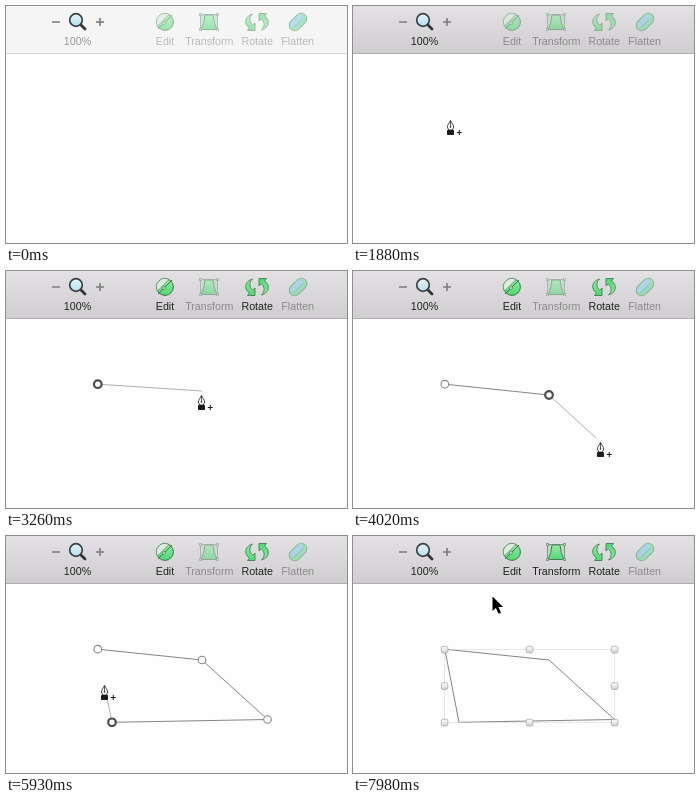
An HTML page for the animation above (8000 ms loop, 341 by 237 pixels).

```html
<!DOCTYPE html>
<html lang="en">
<head>
<meta charset="utf-8">
<title>Drawing a shape with the pen tool</title>
<style>
  html, body { margin: 0; width: 100%; height: 100%; overflow: hidden; background: #fefefe; }
  svg { display: block; width: 100%; height: 100%; }
  text { font: 10.7px "Liberation Sans", Arial, sans-serif; text-anchor: middle; fill: #222; }
  .tool.off g { opacity: .55; }
  .tool.off text { fill: #8c8a8c; }
  .idle text { fill: #999; }
  .idle .tool.off text { fill: #bababa; }
  .idle #bar { fill: #f5f5f5; }
  .idle #edge { fill: #d3d3d3; }
  .node { fill: #fff; stroke: #858585; stroke-width: 1.1; }
  .node.current { stroke: #4c4c4c; stroke-width: 2.2; }
  .handle { fill: url(#knob); stroke: #a9a9a9; stroke-width: .8; }
</style>
</head>
<body>
<svg id="stage" viewBox="0 0 341 237">
  <defs>
    <linearGradient id="chrome" x2="0" y2="1">
      <stop stop-color="#e3e1e3"/><stop offset="1" stop-color="#cfcdcf"/>
    </linearGradient>
    <linearGradient id="green" x2="0" y2="1">
      <stop stop-color="#8cf0a0"/><stop offset="1" stop-color="#4fd873"/>
    </linearGradient>
    <linearGradient id="lens" x2="0" y2="1">
      <stop stop-color="#e6f4f6"/><stop offset="1" stop-color="#b2e2ee"/>
    </linearGradient>
    <linearGradient id="knob" x2="0" y2="1">
      <stop stop-color="#fff"/><stop offset="1" stop-color="#d2d2d2"/>
    </linearGradient>
  </defs>

  <rect id="bar" width="341" height="47" fill="url(#chrome)"/>
  <rect id="edge" y="47" width="341" height="1" fill="#aeacae"/>

  <path d="M46 16h8M90 16h8M94 12v8" stroke="#7c7c7c" stroke-width="1.6"/>
  <path d="M74.500 18.500l4.500 4.500" stroke="#333" stroke-width="2.800" stroke-linecap="round"/>
  <circle cx="70" cy="14" r="6.300" fill="url(#lens)" stroke="#3b4145" stroke-width="1.700"/>
  <text x="71.500" y="39">100%</text>

  <g class="tool" id="edit">
    <g stroke="#3d7a4c">
      <circle cx="159" cy="16" r="8.400" fill="url(#green)"/>
      <path d="M151.500 20A8.400 8.400 0 0 1 163 8.600Z" fill="#dcebde" stroke-width=".6"/>
      <path d="M152 23L166 9" stroke="#4a6350" stroke-width=".9"/>
      <circle cx="158" cy="17" r="1.400" fill="#e8f5ea" stroke-width=".7"/>
    </g>
    <text x="159" y="39">Edit</text>
  </g>

  <g class="tool" id="transform">
    <g stroke="#55795d">
      <path d="M194.500 8.500h17v15h-17z" fill="#b9dcc0" stroke="#839487"/>
      <path d="M199 9h8Q207.500 17 211 23.500H195Q198.500 17 199 9Z" fill="url(#green)"/>
      <path d="M193.500 7.500h2v2h-2zM210.500 7.500h2v2h-2zM193.500 22.500h2v2h-2zM210.500 22.500h2v2h-2z" fill="#e5e8e5" stroke-width=".7"/>
    </g>
    <text x="203.300" y="39">Transform</text>
  </g>

  <g class="tool" id="rotate">
    <g fill="url(#green)" stroke="#3f8052" stroke-width=".9">
      <path id="arrow" d="M246.500 8C238 10.500 238 18.500 243.500 22L241.500 24.500H249V17L246.800 19.200C242.800 16 243 11 246.500 8Z"/>
      <use href="#arrow" transform="rotate(180 251 16)"/>
    </g>
    <text x="251.200" y="39">Rotate</text>
  </g>

  <g class="tool off">
    <g stroke-linecap="round">
      <path d="M288.700 19.300l6.600 -6.600" stroke="#3f8a68" stroke-width="12"/>
      <path d="M288.700 19.300l6.600 -6.600" stroke="#6fdc9b" stroke-width="10.200"/>
      <path d="M287.500 18l6.500 -6.500" stroke="#86cdec" stroke-width="6"/>
      <path d="M287.500 22l9.500 -9.500" stroke="#4a9084" stroke-width=".8"/>
    </g>
    <text x="291.700" y="39">Flatten</text>
  </g>

  <path id="outline" fill="none" stroke="#858585"/>
  <path id="preview" fill="none" stroke="#b0b0b0"/>
  <g id="nodes"></g>
  <g id="selection">
    <rect x="91.500" y="113.500" width="170" height="73" fill="none" stroke="#d0d0d0" stroke-dasharray="1 1"/>
  </g>

  <path id="pointer" d="M0 0V14.500L3.400 11.400L6 17.300L8.500 16.200L6 10.500H10.600Z" fill="#000" stroke="#fff" stroke-width="1.100" paint-order="stroke"/>
  <g id="pen">
    <path d="M.5 .3C1.500 3 3.700 5 3.700 7L2.300 10H-1.300L-2.700 7C-2.700 5 -.5 3 .5 .3Z" fill="#fff" stroke="#333" stroke-width=".9"/>
    <path d="M.5 1V6" stroke="#333" stroke-width=".8"/>
    <circle cx=".5" cy="6.800" r=".9" fill="#333"/>
    <rect x="-3" y="10" width="7" height="5" rx=".8" fill="#1c1c1c"/>
    <path d="M6.800 12.500h5M9.300 10v5" stroke="#222" stroke-width="1.100"/>
  </g>
</svg>
<script>
const LOOP = 8000, LINE_LAG = 50;
const ENTER = 350, ACTIVATE = 870, PEN_ON = 1830, CLOSE = 6590, SELECT = 6660;
const entry = { x: 252, y: 232 };

const points = [
  { x: 91.8, y: 113.2, at: 2270 },
  { x: 196, y: 124, at: 3380 },
  { x: 261.5, y: 183.5, at: 4480 },
  { x: 106, y: 186.3, at: 5430 }
];

// Each move eases out by its power; bow bends the path sideways.
const moves = [
  { from: ENTER, to: 800, x: 101, y: 114, power: 2, bow: 0 },
  { from: PEN_ON, to: 2080, x: 91, y: 113, power: 2, bow: 0 },
  { from: 2450, to: 3210, x: 196, y: 120, power: 4, bow: 3 },
  { from: 3210, to: 3310, x: 195, y: 124, power: 4, bow: 0 },
  { from: 3650, to: 4330, x: 261, y: 183, power: 2, bow: 0 },
  { from: 4670, to: 5380, x: 106, y: 186, power: 5, bow: -11 },
  { from: 5730, to: 6320, x: 91, y: 113, power: 1.7, bow: 0 },
  { from: 7050, to: 7400, x: 82, y: 160, power: 1, bow: 4 },
  { from: 7400, to: 7980, x: 139, y: 60, power: 1, bow: 18 }
];

const $ = id => document.getElementById(id);
const show = (id, on) => $(id).style.display = on ? '' : 'none';
const enable = (id, on) => $(id).classList.toggle('off', !on);
const pair = ({ x, y }) => `${x} ${y}`;

function add(parent, tag, attrs) {
  const el = document.createElementNS('http://www.w3.org/2000/svg', tag);
  for (const name in attrs) el.setAttribute(name, attrs[name]);
  return parent.appendChild(el);
}

const nodes = points.map(({ x, y }) => add($('nodes'), 'circle', { cx: x, cy: y, r: 3.8 }));
for (let i = 0; i < 9; i++) {
  if (i === 4) continue;
  const x = 88.3 + 85 * (i % 3), y = 110.3 + 36.5 * Math.floor(i / 3);
  add($('selection'), 'rect', { class: 'handle', x, y, width: 6.6, height: 6.6, rx: 1.6 });
}

function cursorAt(t) {
  let { x, y } = entry;
  for (const move of moves) {
    if (t < move.from) break;
    const k = Math.min(1, (t - move.from) / (move.to - move.from));
    const eased = 1 - (1 - k) ** move.power;
    const dx = move.x - x, dy = move.y - y;
    const side = move.bow * Math.sin(Math.PI * eased) / Math.hypot(dx, dy);
    x += dx * eased - dy * side;
    y += dy * eased + dx * side;
  }
  return { x: Math.round(x), y: Math.round(y) };
}

function render(t) {
  const placed = points.filter(p => t >= p.at);
  const last = placed[placed.length - 1];
  const closed = t >= CLOSE, selected = t >= SELECT;
  const usingPen = t >= PEN_ON && !selected;

  $('stage').classList.toggle('idle', t < ACTIVATE);
  enable('edit', last);
  enable('rotate', last);
  enable('transform', closed);

  $('outline').setAttribute('d', last ? 'M' + placed.map(pair).join('L') + (closed ? 'Z' : '') : '');
  const drawing = last && !closed && t - LINE_LAG > last.at;
  $('preview').setAttribute('d', drawing ? `M${pair(last)}L${pair(cursorAt(t - LINE_LAG))}` : '');

  nodes.forEach((node, i) => {
    node.style.display = i < placed.length && !selected ? '' : 'none';
    node.setAttribute('class', points[i] === last && !closed ? 'node current' : 'node');
  });
  show('selection', selected);

  const place = `translate(${pair(cursorAt(t))})`;
  $('pen').setAttribute('transform', place);
  $('pointer').setAttribute('transform', place + ' translate(.5 .5)');
  show('pen', usingPen);
  show('pointer', t >= ENTER && !usingPen);
}

const start = performance.now();
function tick() {
  render((performance.now() - start) % LOOP);
  requestAnimationFrame(tick);
}
tick();
</script>
</body>
</html>
```
